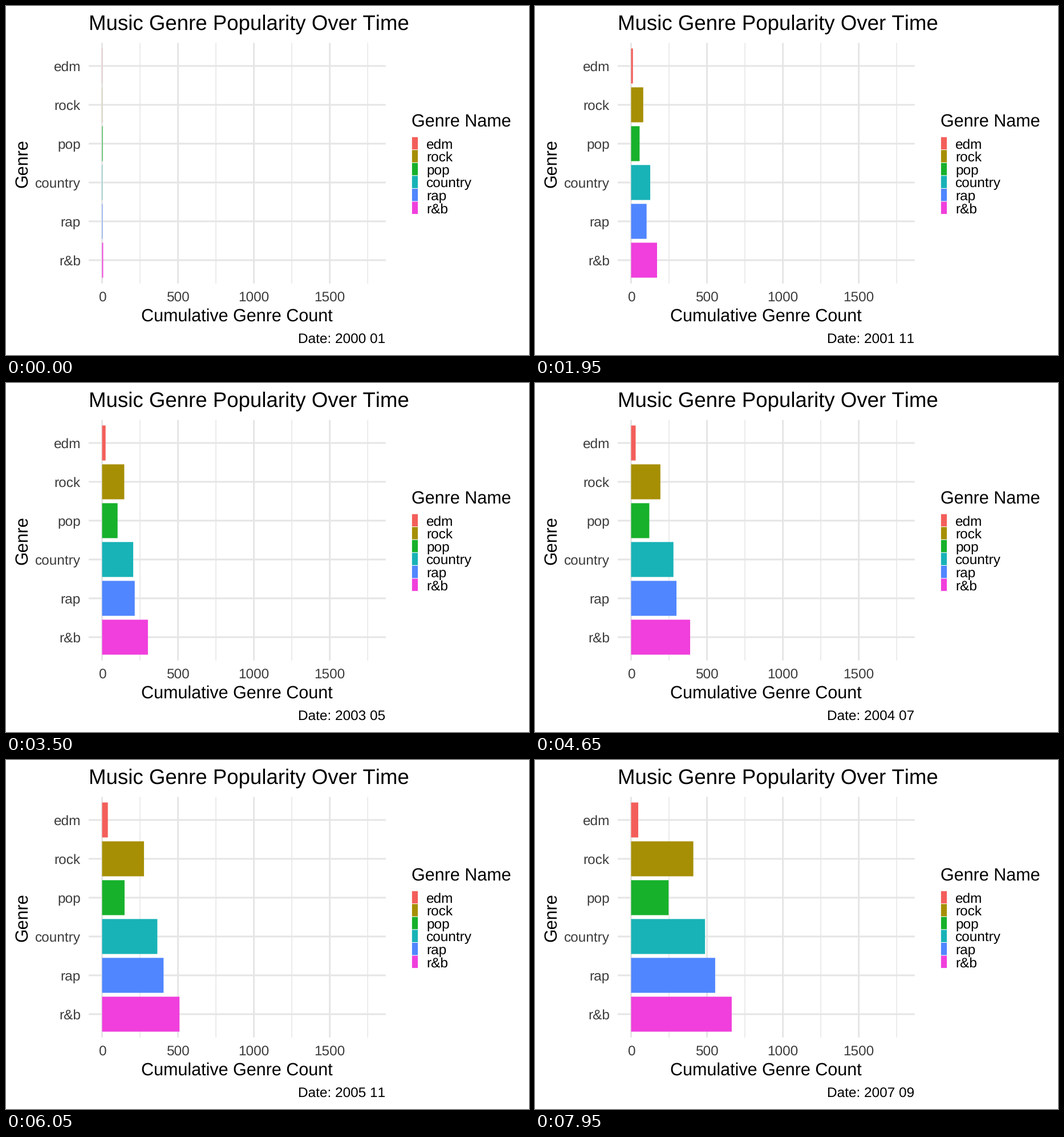
Write a matplotlib script that moves like this. It is 917x611 px and loops after 8 s.

```python
import numpy as np
import matplotlib.pyplot as plt
from matplotlib.animation import FuncAnimation
from matplotlib.patches import Rectangle

W, H, DPI = 917, 611, 100
FRAMES, INTERVAL = 160, 50

plt.rcParams.update({
    "font.family": "Liberation Sans",
    "text.hinting": "none",
    "text.kerning_factor": 6,
    "path.snap": False,
})

GENRES = ["edm", "rock", "pop", "country", "rap", "r&b"]
COLORS = ["#F35E5A", "#A68F05", "#17B12B", "#18B3B7", "#5086FF", "#F03FDC"]
GRID, TICK = "#E5E5E5", "#3C3C3C"

# Panel geometry in pixels
LEFT, RIGHT, TOP, BOTTOM = 145, 665.8, 64.6, 485.8
X0, PER_UNIT = 168.5, 0.2661
ROW0, ROW_STEP, BAR_H = 105.0, 68.0, 61.2

# Cumulative counts at chosen frames, one row per genre
KEYS = [0, 39, 70, 93, 121, 137, 159]
COUNTS = [
    [1, 12, 23, 30, 38, 43, 48.5],
    [1, 80, 146, 193, 276, 336, 410],
    [4, 56, 102, 120, 148, 185, 247],
    [2, 126, 205, 279, 364, 422, 487],
    [3, 102, 215, 299, 405, 482, 554],
    [7, 171, 302, 389, 510, 573, 663],
]
EDM_LIMIT = 47

fig = plt.figure(figsize=(W / DPI, H / DPI), dpi=DPI, facecolor="white")
ax = fig.add_axes([0, 0, 1, 1])
ax.set_xlim(0, W)
ax.set_ylim(H, 0)
ax.axis("off")


def line(xs, ys, px):
    ax.plot(xs, ys, color=GRID, lw=px * 72 / DPI,
            solid_capstyle="butt", zorder=1)


def label(x, y, text, size, color="black", **kw):
    return ax.text(x, y, text, fontsize=size, color=color,
                   ha="left", va="baseline", **kw)


def box(x, y, w, h, color):
    patch = Rectangle((x, y), w, h, facecolor=color, lw=0, zorder=2)
    return ax.add_patch(patch)


def x_at(value):
    return X0 + value * PER_UNIT


for value in range(250, 1751, 500):
    line([x_at(value)] * 2, [TOP, BOTTOM], 1.48)
for i in range(6):
    line([LEFT, RIGHT], [ROW0 + i * ROW_STEP] * 2, 2.96)
for value in range(0, 1501, 500):
    line([x_at(value)] * 2, [TOP, BOTTOM], 2.96)
    text = str(value)
    label(x_at(value) - 6.8 * len(text), 517.5, text, 17.6, TICK)

label(145, 42, "Music Genre Popularity Over Time", 26.4)
label(237, 552, "Cumulative Genre Count", 22)
label(37, 318, "Genre", 22, rotation=90, rotation_mode="anchor")
label(711, 211, "Genre Name", 22)

bars = []
NAME_X = [83.5, 84.8, 90.2, 50.9, 95.7, 93]
for i, (name, color) in enumerate(zip(GENRES, COLORS)):
    y = ROW0 + i * ROW_STEP
    label(NAME_X[i], y + 9, name, 17.6, TICK)
    bars.append(box(X0, y - BAR_H / 2, 0, BAR_H, color))
    key_y = 229.6 + 22.6 * i
    box(711.9, key_y, 10.2, 21.5, color)
    label(737, key_y + 19.9, name, 17.6)

date = label(511.6, 591, "", 17.6)


def update(frame):
    for i, bar in enumerate(bars):
        count = np.interp(frame, KEYS, COUNTS[i])
        if i == 0:
            count = min(count, EDM_LIMIT)
        bar.set_width(count * PER_UNIT)
    month = int(frame * 0.5786 + 0.3)
    date.set_text(f"Date: {2000 + month // 12} {month % 12 + 1:02d}")
    return bars + [date]


anim = FuncAnimation(fig, update, frames=FRAMES, interval=INTERVAL,
                     init_func=lambda: update(0), repeat=True,
                     repeat_delay=0, blit=False)
plt.show()
```
